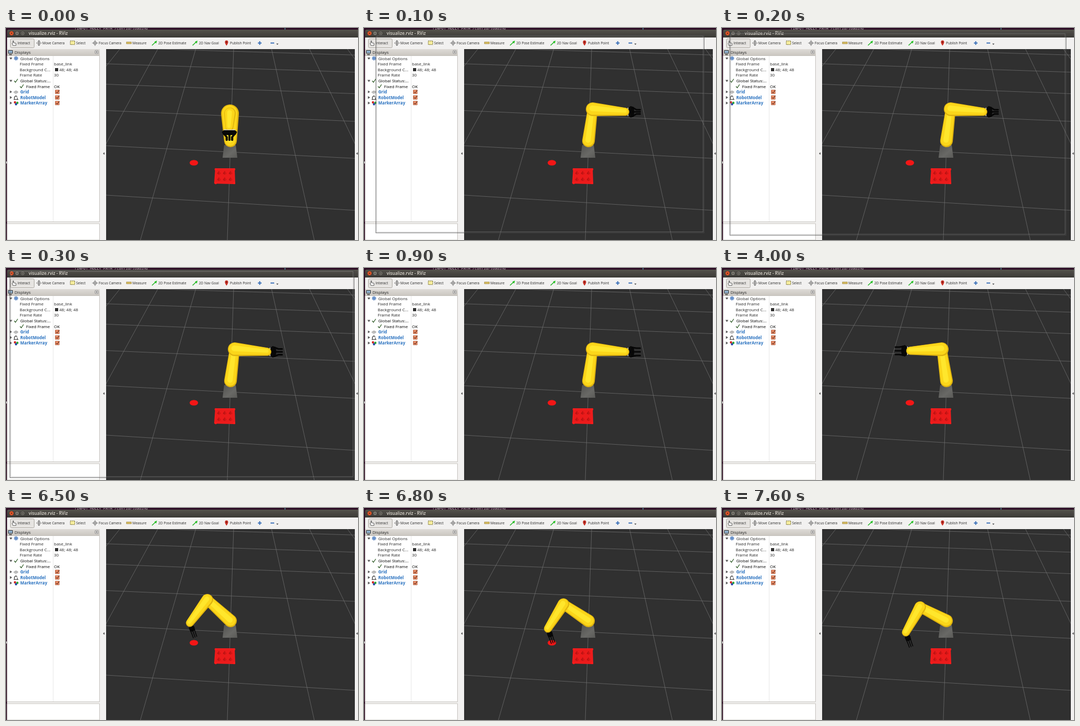
An HTML page for the animation above (8000 ms loop, 668x402 px).

```html
<!DOCTYPE html>
<html lang="en">
<head>
<meta charset="utf-8">
<title>Robot arm viewer</title>
<style>
  html, body { margin: 0; width: 100%; height: 100%; overflow: hidden; background: #303030; }
  svg { display: block; width: 100vw; height: 100vh; }
  text { font-family: "Open Sans", "Noto Sans", sans-serif; font-size: 8px; fill: #262626; white-space: pre; }
  .title { font-size: 8.25px; font-weight: 600; fill: #dfdbd2; }
  .tool { font-size: 6.55px; }
  .link { font-weight: 700; fill: #2a72c0; }
  .strong { fill: #000; }
  .shell { font: 7px "DejaVu Sans Mono", monospace; fill: #bdb6ba; }
  .line { fill: none; stroke-linecap: round; stroke-linejoin: round; }
</style>
</head>
<body>
<svg viewBox="0 0 668 402" preserveAspectRatio="none">
  <defs>
    <linearGradient id="bar" x2="0" y2="1">
      <stop stop-color="#54524c"/><stop offset="1" stop-color="#3b3a36"/>
    </linearGradient>
    <linearGradient id="head" x2="0" y2="1">
      <stop stop-color="#dedbd7"/><stop offset="1" stop-color="#cbc7c1"/>
    </linearGradient>
    <linearGradient id="stone" x2="1" y2="1">
      <stop stop-color="#525250"/><stop offset=".6" stop-color="#696966"/><stop offset="1" stop-color="#5b5b58"/>
    </linearGradient>
    <clipPath id="view"><path d="M190 40H662V402H190Z"/></clipPath>
    <clipPath id="strip"><path d="M0 0H668V3H0Z"/></clipPath>
  </defs>

  <!-- window frame -->
  <path d="M0 0H668V402H0Z" fill="#2b0a22"/>
  <g clip-path="url(#strip)">
    <text class="shell" x="130" y="2.500">[INFO] MOLLY PATH /config/loading</text>
    <path d="M529.500 0V3" stroke="#58b6c2"/>
  </g>
  <path d="M2 18V6Q2 3 5 3H668V18Z" fill="url(#bar)"/>
  <path d="M2 18H668V402H2Z" fill="#f2f1f0"/>
  <path d="M0 253H1.500V257H0Z" fill="#ddd"/>
  <circle cx="10.500" cy="10" r="4.300" fill="#e9592b" stroke="#30302c" stroke-width=".7"/>
  <path d="M9 8.500L12 11.500M12 8.500L9 11.500" stroke="#502010"/>
  <g fill="#7c7a72" stroke="#30302c" stroke-width=".7">
    <circle cx="21" cy="10" r="4"/><circle cx="31.500" cy="10" r="4"/>
  </g>
  <path class="line" d="M19.500 10H22.500M30 8.500H33V11.500H30Z" stroke="#3a3935" stroke-width=".9"/>
  <text class="title" x="43" y="13">visualize.rviz - RViz</text>

  <!-- tool bar -->
  <rect x="8.500" y="20.500" width="45" height="17" rx="2" fill="#e6e4e1" stroke="#aaa69f"/>
  <path d="M13 33L11.500 29 13 28.500V24.500H14.500V28L19 29V33Z" fill="#fff" stroke="#333" stroke-width=".8"/>
  <path class="line" d="M58 28.500H67M62.500 24V33M60 26L62.500 24 65 26M60 31L62.500 33 65 31" stroke="#555"/>
  <rect x="122" y="24.500" width="8.500" height="7" fill="#f5ec9c" stroke="#6c6530" stroke-dasharray="2 1"/>
  <g class="line" stroke="#777"><circle cx="169" cy="28.500" r="3"/><path d="M164 28.500H174M169 23.500V33.500"/></g>
  <path d="M228.500 26.500H238V30H228.500Z" fill="#d8bd5c" stroke="#8a753a" stroke-width=".6"/>
  <g id="poseIcon">
    <path class="line" d="M277.500 32.500L284.500 26" stroke="#22b422" stroke-width="1.500"/>
    <path d="M286.500 24L281.500 26 285 29.500Z" fill="#22c022"/>
  </g>
  <use href="#poseIcon" x="77"/>
  <path d="M418.500 33.500Q415 28.500 415.500 26.500A3 3 0 0 1 421.500 26.500Q422 28.500 418.500 33.500Z" fill="#c93026"/>
  <circle cx="418.500" cy="26.800" r="1.100" fill="#5a1510"/>
  <path d="M478 28.500H485M481.500 25V32M502 28.500H509" stroke="#3b70b8" stroke-width="2"/>
  <path d="M513 29.500H517L515 32Z" fill="#444"/>

  <!-- displays panel -->
  <path d="M2 40H178V52H2Z" fill="url(#head)"/>
  <path d="M4.500 42.500H12.500V48H4.500Z" fill="#8fb0cc" stroke="#333"/>
  <path d="M6 50.500H11" stroke="#333" stroke-width="1.500"/>
  <rect x="169" y="42.500" width="6" height="6" rx="1" fill="#f4f2f0" stroke="#777" stroke-width=".8"/>
  <path d="M170.500 44L173.500 47M173.500 44L170.500 47" stroke="#333" stroke-width=".9"/>
  <path d="M2 52.500H177.500V367.500H2ZM2 371H177.500V402H2Z" fill="#fff" stroke="#b7b3ad" stroke-width=".8"/>
  <path d="M89.500 53V367" stroke="#dedede" stroke-width=".7"/>
  <circle cx="19" cy="57.500" r="3.300" fill="#6a93cc"/>
  <circle cx="19" cy="57.500" r="3.800" fill="none" stroke="#5f88c2" stroke-dasharray="1.500 1.500"/>
  <path d="M93 76H99V82H93Z" fill="#303030"/>
  <path class="line" d="M16 100.500L18 103 22 97M27 111L29 113.500 33 107.500" stroke="#2c5a24" stroke-width="1.300"/>
  <path class="line" d="M15 121.500L19 119 23 121.500 19 124ZM17 120.200L21 122.800M21 120.200L17 122.800" stroke="#777" stroke-width=".8"/>
  <path class="line" d="M16 135V131L19 128.500 21 131M15 135.500H23M21.500 133V135" stroke="#333" stroke-width="1.200"/>
  <circle cx="17" cy="141" r="2.200" fill="#d42a26"/>
  <circle cx="21.500" cy="142" r="2.200" fill="#28a535"/>
  <circle cx="19" cy="144.500" r="2.200" fill="#294aa8"/>
  <path d="M187 235.500V240.500L184 238ZM667.500 235.500V240.500L664.500 238Z" fill="#555"/>
  <g id="labels"></g>

  <!-- 3D view -->
  <g clip-path="url(#view)">
    <path d="M190 40H664V402H190Z" fill="#303030"/>
    <g id="grid" stroke="#747474" stroke-width=".7"></g>
    <path d="M414 222H436L439 246H411Z" fill="url(#stone)"/>
    <g id="tray">
      <path d="M398 267H433L434 295 396 294Z" fill="#ea1b1b" stroke="#f21c1c" stroke-width="2" stroke-linejoin="round"/>
    </g>
    <ellipse id="disc" cx="356.500" cy="255.500" rx="8" ry="5.300" fill="#f31616"/>
    <g id="arm"></g>
  </g>

  <g id="outline" fill="none">
    <rect width="668" height="402" stroke="#484848" stroke-opacity=".75" stroke-width="1.200"/>
    <rect x="2" y="2" width="664" height="398" stroke="#a5a5a5" stroke-opacity=".4"/>
  </g>
</svg>
<script>
const LOOP = 8000, STEP = 100;
const $ = id => document.getElementById(id);

function add(parent, tag, attrs, content = '') {
  const node = document.createElementNS('http://www.w3.org/2000/svg', tag);
  for (const key in attrs) node.setAttribute(key, attrs[key]);
  node.textContent = content;
  parent.appendChild(node);
}
const label = (x, y, text, style = '') => add($('labels'), 'text', { x, y, class: style }, text);
const mark = (d, attrs) => add($('labels'), 'path', { d, ...attrs });

// Tool bar and panel text
Object.entries({
  'Interact': 22, 'Move Camera': 69, 'Select': 133, 'Focus Camera': 176, 'Measure': 240,
  '2D Pose Estimate': 289, '2D Nav Goal': 366, 'Publish Point': 425
}).forEach(([text, x]) => label(x, 31, text, 'tool'));
label(16, 49, 'Displays');

['Global Options', ' Fixed Frame|base_link', ' Background C...|48; 48; 48', ' Frame Rate|30',
 'Global Status:...', '  Fixed Frame|OK', 'Grid', 'RobotModel', 'MarkerArray'].forEach((entry, row) => {
  const [name, value] = entry.split('|');
  const mid = 57.5 + row * 10.6, display = row > 5, nested = name.startsWith(' ');
  const style = display ? 'link' : row > 3 ? 'strong' : '';
  label(name.startsWith('  ') ? 38 : nested ? 26 : 27, mid + 3, name.trim(), style);
  if (value) label(row === 2 ? 101 : 91, mid + 3, value, style);
  if (!nested) mark(display ? `M7.500 ${mid - 2.7}v5.400l4-2.700z` : `M6.500 ${mid - 1.5}h5.500l-2.750 4z`, { fill: '#555' });
  if (display) {
    mark(`M93.500 ${mid - 3.5}h7.500v7h-7.500z`, { fill: '#f09068', stroke: '#a8573a', 'stroke-width': .8 });
    mark(`M95 ${mid}l2 2 4-5`, { class: 'line', stroke: '#6b3525', 'stroke-width': 1.1 });
  }
});

// Ground grid: rows shrink towards the horizon, columns meet there
const HORIZON = -240;
for (let n = 0; n < 6; n++) {
  const depth = 1 / (0.00175 + 0.000354 * n), y = HORIZON + depth, rise = 237 * depth * 0.000107;
  add($('grid'), 'line', { x1: 190, y1: y - rise, x2: 664, y2: y + rise });
}
for (let k = -3; k <= 3; k++)
  add($('grid'), 'line', { x1: 432 + 72 * k, y1: 40, x2: 420 + 165 * k, y2: 402 });

// Tray: corner pegs and two rows of cups
for (let i = 0; i < 4; i++)
  add($('tray'), 'circle', { cx: i % 2 ? 433 : 398, cy: i > 1 ? 294 : 268, r: 2.2, fill: '#fb1c1c' });
for (let i = 0; i < 6; i++) {
  const x = 404 + (i % 3) * 11, y = 274 + (i > 2) * 12;
  add($('tray'), 'path', { d: `M${x - 3.5} ${y + 2}l3.500-5 3.500 5-3.500 2z`, fill: '#b81313' });
  add($('tray'), 'path', { d: `M${x} ${y - 2}l3 4-3 1z`, fill: '#dc1717' });
}

// Outline around two circles, the body of an arm link
function hull([x1, y1], r1, [x2, y2], r2, fill) {
  const angle = Math.atan2(y2 - y1, x2 - x1);
  const open = Math.acos((r1 - r2) / Math.hypot(x2 - x1, y2 - y1));
  const on = (x, y, r, a) => `${x + r * Math.cos(a)} ${y + r * Math.sin(a)}`;
  const arc = (r, large) => `A${r} ${r} 0 ${+large} 1 `;
  return `<path fill="${fill}" d="M${on(x1, y1, r1, angle + open)}${arc(r1, r1 > r2)}${on(x1, y1, r1, angle - open)}`
    + `L${on(x2, y2, r2, angle - open)}${arc(r2, r2 > r1)}${on(x2, y2, r2, angle + open)}Z"/>`;
}

// Shaded link: dark rim, body and highlight, lit from above
function link(a, ra, b, rb) {
  const layer = (size, lift, fill) =>
    hull([a[0] - lift / 2, a[1] - lift], ra * size, [b[0] - lift / 2, b[1] - lift], rb * size, fill);
  return layer(1, 0, '#dfb30f') + layer(0.86, 0.8, '#fbd61a') + layer(0.42, 1.6, '#ffe62c');
}

// Gripper with three fingers, pointing along +x
function hand([x, y], angle, [length, width], spread) {
  const fingers = [-1, 0, 1].map(k => `M9 ${k * 8}L16 ${k * spread}H23`).join('');
  return `<g transform="translate(${x} ${y}) rotate(${angle}) translate(5) scale(${length} ${width})">`
    + '<path d="M1-8L5-11 11-9 12 0 11 9 5 11 1 8Z" fill="#080808"/>'
    + `<path class="line" d="${fingers}" stroke="#060606" stroke-width="3"/>`
    + '<path d="M0-8V8" stroke="#d6d3c4" stroke-width="1.500"/></g>';
}

const base = { shoulder: [426, 214], upper: 9.5, fore: 13, angle: 0, grip: [1, 1] };
const front = { ...base, elbow: [425, 162], wrist: [424, 188], upper: 17, fore: 11, angle: 90, grip: [.85, 1.3] };
const right = { ...base, elbow: [434, 154], wrist: [496, 159] };
const left = { ...base, elbow: [417, 154], wrist: [357, 157], angle: 180 };
const raised = { ...base, elbow: [382, 174], wrist: [349, 218], fore: 11, angle: 70, grip: [1, .5] };
const lowered = { ...raised, elbow: [376, 188], wrist: [349, 236] };

const clamp = v => Math.min(1, Math.max(0, v));
const mix = (a, b, k) => a.map((v, i) => v + (b[i] - v) * k);

function poseAt(t) {
  if (t < 100) return front;
  if (t < 3300) return right;
  if (t < 6500) return left;
  const drop = clamp((t - 6500) / 500);
  return { ...raised, elbow: mix(raised.elbow, lowered.elbow, drop), wrist: mix(raised.wrist, lowered.wrist, drop) };
}

function drawArm(t) {
  const { shoulder, elbow, wrist, upper, fore, angle, grip } = poseAt(t);
  const opening = t < 3300 ? clamp((t - 200) / 200) : clamp((t - 3400) / 200);
  $('arm').innerHTML = link(elbow, upper, shoulder, 12)
    + hand(wrist, angle, grip, 4 + 3 * opening)
    + link(elbow, fore, wrist, 7.5)
    + (angle === 90 ? hand(wrist, angle, grip, 4) : '');
}

const show = (node, on) => node.setAttribute('visibility', on ? 'visible' : 'hidden');

function draw(t) {
  drawArm(t);
  show($('disc'), t < 6900);
  // The window outline grows to full size, then goes
  show($('outline'), t >= 100 && t < 400);
  const scale = 0.955 + (t - 200) / STEP * 0.0225;
  $('outline').setAttribute('transform', `translate(334 201) scale(${scale}) translate(-334 -201)`);
}

const start = performance.now();
let drawn = -1;
function tick() {
  const t = Math.floor((performance.now() - start) % LOOP / STEP) * STEP;
  if (t !== drawn) draw(drawn = t);
  requestAnimationFrame(tick);
}
tick();
</script>
</body>
</html>
```
